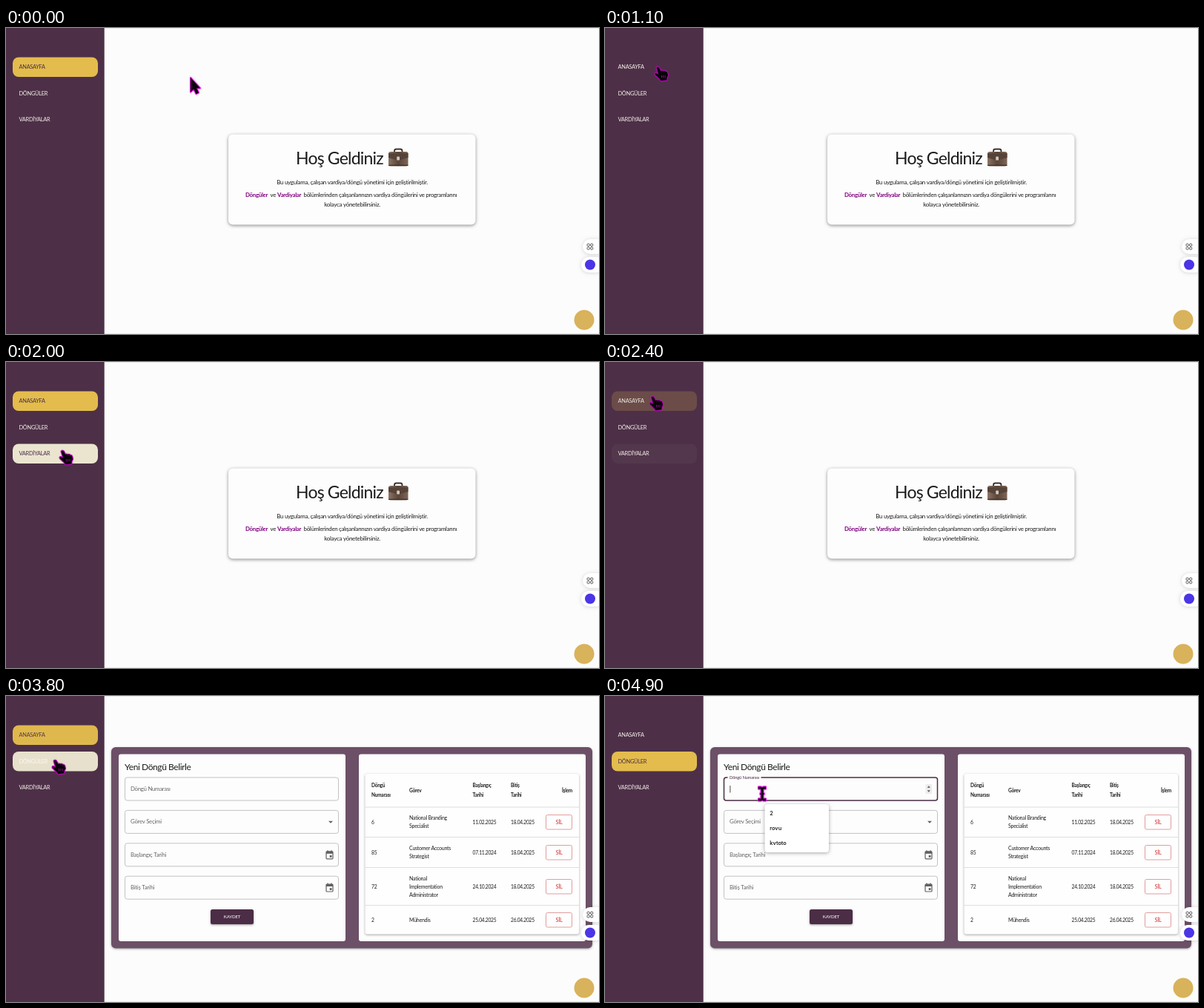
Write an HTML page with a canvas that moves like this. It is 800 px wide and 413 px high and loops after 5 s.

```html
<!DOCTYPE html>
<html lang="tr">
<head>
<meta charset="utf-8">
<title>Vardiya yönetimi</title>
<style>
html, body { margin: 0; width: 100%; height: 100%; overflow: hidden; background: #fcfcfc; }
canvas { display: block; width: 800px; height: 413px; }
</style>
</head>
<body>
<canvas id="stage" width="800" height="413"></canvas>
<script>
const ctx = document.getElementById('stage').getContext('2d');
const LOOP = 5000, STEP = 100, FADE = 250;
const PAGE_AT = 3800, FOCUS_AT = 4600, MENU_AT = 4700;
const FONT = 'Lato, "Noto Sans", sans-serif', TRACKING = -0.035;
const PLUM = [77, 48, 71], YELLOW = [227, 188, 77], CREAM = [235, 229, 208], LIGHT = [244, 238, 232];
const DARK = '#4b2d46', INK = '#1c1c1c', GREY = '#666';

const rgb = c => `rgb(${c.map(Math.round).join()})`;
const mix = (a, b, k) => a + (b - a) * k;
const blend = (a, b, k) => a.map((v, i) => mix(v, b[i], k));
const clamp = v => Math.min(1, Math.max(0, v));
const smooth = p => p * p * (3 - 2 * p);

// Each menu entry fades towards a new fill level at the listed times.
const menu = [
  { label: 'ANASAYFA', y: 39.5, start: 1, keys: [[600, 0], [1270, 1], [2222, 0], [2820, 1], [3775, 0]], tint: () => YELLOW },
  { label: 'DÖNGÜLER', y: 75, start: 0, keys: [[1350, 1], [1690, 0], [2940, 1], [3775, 0], [4250, 1]], tint: t => t < 4200 ? CREAM : YELLOW },
  { label: 'VARDİYALAR', y: 110.5, start: 0, keys: [[1740, 1], [2180, 0]], tint: () => CREAM }
];

const path = [
  [0, 249, 67], [200, 232, 71], [400, 150, 62], [600, 90, 55], [800, 70, 52], [1100, 71, 53],
  [1300, 72, 70], [1400, 73, 86], [1600, 76, 98], [1700, 78, 109], [1900, 78, 122], [2100, 74, 118],
  [2250, 67, 65], [2400, 64, 47], [2700, 65, 50], [2850, 65, 70], [3000, 65, 80], [3100, 65, 83],
  [3800, 66, 87], [4200, 72, 89], [4400, 150, 118], [4600, 206, 128], [4900, 212, 132]
];

const rows = [
  [170, '6', ['National Branding', 'Specialist'], '11.02.2025', '18.04.2025'],
  [211, '85', ['Customer Accounts', 'Strategist'], '07.11.2024', '18.04.2025'],
  [257, '72', ['National', 'Implementation', 'Administrator'], '24.10.2024', '18.04.2025'],
  [302, '2', ['Mühendis'], '25.04.2025', '26.04.2025']
];

function text(str, x, y, size, color = INK, align = 'left', weight = 400, family = FONT) {
  ctx.font = `${weight} ${size}px ${family}`;
  ctx.letterSpacing = family === FONT ? `${TRACKING * size}px` : '0px';
  ctx.textAlign = align;
  ctx.textBaseline = 'alphabetic';
  ctx.fillStyle = color;
  ctx.fillText(str, x, y);
  return ctx.measureText(str).width;
}

function box(x, y, w, h, r, fill, stroke, line = 1) {
  ctx.beginPath();
  ctx.roundRect(x, y, w, h, r);
  if (fill) { ctx.fillStyle = fill; ctx.fill(); }
  if (stroke) { ctx.strokeStyle = stroke; ctx.lineWidth = line; ctx.stroke(); }
}

function raised(blur, dy, alpha, draw) {
  ctx.save();
  ctx.shadowColor = `rgba(0,0,0,${alpha})`;
  ctx.shadowBlur = blur;
  ctx.shadowOffsetY = dy;
  draw();
  ctx.restore();
}

function disc(x, y, r, color) {
  ctx.beginPath();
  ctx.arc(x, y, r, 0, 7);
  ctx.fillStyle = color;
  ctx.fill();
}

function poly(points, fill) {
  ctx.beginPath();
  points.forEach(([x, y]) => ctx.lineTo(x, y));
  ctx.closePath();
  ctx.fillStyle = fill;
  ctx.fill();
}

function level(item, t) {
  return item.keys.reduce((v, [at, to]) => mix(v, to, smooth(clamp((t - at) / FADE))), item.start);
}

function drawSidebar(t) {
  ctx.fillStyle = rgb(PLUM);
  ctx.fillRect(0, 0, 132.7, 413);
  for (const item of menu) {
    const k = level(item, t);
    if (k > 0.01) box(9, item.y, 115, 26.5, 8, rgb(blend(PLUM, item.tint(t), k)));
    const pressed = item === menu[1] && t >= PAGE_AT && t < 4300;
    text(item.label, 17.5, item.y + 15.7, 7.4, rgb(pressed ? [250, 247, 242] : blend(LIGHT, PLUM, k * k)));
  }
}

function drawBriefcase() {
  box(524, 163.5, 10.5, 8, 2.5, null, '#3d302b', 1.8);
  const g = ctx.createLinearGradient(516, 0, 542, 0);
  g.addColorStop(0, '#8b7465');
  g.addColorStop(0.5, '#5b4539');
  g.addColorStop(1, '#7d6555');
  box(516, 167, 26.5, 19.5, 2.5, g);
  poly([[516, 169], [542.5, 169], [542.5, 175], [532, 178], [526, 178], [516, 175]], '#56433a');
  ctx.fillStyle = '#3a2c25';
  ctx.fillRect(516, 184.8, 26.5, 1.2);
  box(527.2, 173.5, 3.8, 5, 1, '#d3c8b8');
}

function drawWelcome() {
  raised(4, 1.2, 0.45, () => box(300, 143.5, 333.5, 122, 6, '#fdfdfd'));
  text('Hoş Geldiniz', 391, 183.5, 23);
  drawBriefcase();
  text('Bu uygulama, çalışan vardiya/döngü yönetimi için geliştirilmiştir.', 467, 211, 8, INK, 'center');
  let x = 323;
  const run = (str, gap, color, weight) => { x += text(str, x, 227.5, 7.8, color, 'left', weight) + gap; };
  run('Döngüler', 3.5, '#800080', 700);
  run('ve', 2, INK);
  run('Vardiyalar', 3.5, '#800080', 700);
  run('bölümlerinden çalışanlarınızın vardiya döngülerini ve programlarını', 0, INK);
  text('kolayca yönetebilirsiniz.', 467, 241, 8, INK, 'center');
}

function drawCalendar(x, y) {
  box(x - 4.5, y - 4.5, 9, 10, 1, null, '#606060', 1.2);
  ctx.fillStyle = '#606060';
  ctx.fillRect(x - 4.5, y - 4.5, 9, 3);
  ctx.fillRect(x - 3.2, y - 6, 1.3, 2);
  ctx.fillRect(x + 1.9, y - 6, 1.3, 2);
  ctx.fillRect(x + 0.2, y + 0.7, 2.8, 2.8);
}

function drawForm(t, inField) {
  const focus = t >= FOCUS_AT;
  box(152, 78.5, 306, 252.5, 3, '#fdfdfd');
  text('Yeni Döngü Belirle', 160, 99.5, 12);
  ['Döngü Numarası', 'Görev Seçimi', 'Başlangıç Tarihi', 'Bitiş Tarihi'].forEach((label, i) => {
    const y = 110 + i * 44.4, active = focus && !i;
    const edge = active ? DARK : inField && !i ? '#333' : '#c2c2c2';
    box(160.5, y, 288, 31, 3, null, edge, active ? 1.5 : 1);
    if (!active) return text(label, 168, y + 17.7, 7.8, GREY);
    ctx.fillStyle = '#fdfdfd';
    ctx.fillRect(165.5, y - 2, 45, 4);
    text(label, 168, y + 1.6, 5.8, DARK);
    ctx.fillStyle = INK;
    ctx.fillRect(168.5, 121, 0.8, 9.5);
    box(432.5, 119, 8.5, 13, 1, '#ececec');
    poly([[434.8, 123.8], [438.8, 123.8], [436.8, 121.3]], '#555');
    poly([[434.8, 127.3], [438.8, 127.3], [436.8, 129.8]], '#555');
  });
  poly([[435, 168.7], [441, 168.7], [438, 171.7]], '#606060');
  drawCalendar(436.5, 214.3);
  drawCalendar(436.5, 258.5);
  raised(3, 1, 0.4, () => box(276, 288, 58, 20, 2.5, DARK));
  text('KAYDET', 305, 300.2, 6.2, '#fff', 'center');
}

function drawTable() {
  box(476, 78.5, 306, 252.5, 3, '#fdfdfd');
  raised(3, 1, 0.35, () => box(484.5, 105, 288.5, 216.5, 3, '#fefefe'));
  const head = (lines, x, align) => lines.forEach((s, i) =>
    text(s, x, 129.8 + (i - (lines.length - 1) / 2) * 13, 6.5, INK, align, 700));
  head(['Döngü', 'Numarası'], 493);
  head(['Görev'], 544);
  head(['Başlangıç', 'Tarihi'], 629.5);
  head(['Bitiş', 'Tarihi'], 681);
  head(['İşlem'], 764, 'right');
  ctx.fillStyle = '#dedede';
  for (const y of [149.5, 190, 231, 282]) ctx.fillRect(484.5, y, 288.5, 1);
  for (const [y, id, job, from, to] of rows) {
    text(id, 493, y + 2.6, 6.7);
    job.forEach((s, i) => text(s, 544, y + 2.6 + (i - (job.length - 1) / 2) * 11, 7));
    text(from, 629.5, y + 2.6, 6.7);
    text(to, 681, y + 2.6, 6.7);
    box(728.5, y - 9.5, 35, 19.5, 2, null, '#e29d9d');
    text('SİL', 746, y + 2.8, 7.4, '#d32f2f', 'center');
  }
}

function drawMenu() {
  raised(5, 1, 0.35, () => box(215.5, 146, 86.5, 65, 4, '#fff'));
  ['2', 'rovu', 'kvtoto'].forEach((s, i) =>
    text(s, 222.3, 161 + i * 20, 7.3, '#222', 'left', 600, 'Inter, sans-serif'));
}

function drawWidgets() {
  raised(5, 0.5, 0.16, () => box(778, 285, 30, 20, 10, '#fff'));
  raised(5, 0.5, 0.16, () => box(776, 309, 30, 21, 10, '#fff'));
  for (const dx of [-2.3, 2.3]) for (const dy of [-2.3, 2.3])
    box(786.2 + dx, 293.4 + dy, 3.4, 3.4, 1.7, null, '#555', 1);
  disc(788, 319.5, 7, '#4b35e6');
  disc(780, 394, 13.5, '#d9b25c');
}

const arrow = new Path2D('M0 0V19.5L4.3 15.5L7.5 22L11 20.3L8 14.2H13Z');
const hand = new Path2D('M-1.4 .6Q0 -1 1.8 .6L4.2 5Q6 3.8 7.4 5.2Q9 4.1 10.4 5.8Q12.5 5.2 13.2 7.5L14 11L12.4 14.2V17.2L4.4 18.2L2.5 15.4L-3 10.2Q-4 8.2 -2.4 8L1.2 9.4Z');
const beam = new Path2D('M-5 -9.5H-1.5L0 -8.6L1.5 -9.5H5V-6.5H1.5V-1H2.5V1H1.5V6.5H5V9.5H1.5L0 8.6L-1.5 9.5H-5V6.5H-1.5V1H-2.5V-1H-1.5V-6.5H-5Z');

function drawCursor(x, y, shape) {
  ctx.save();
  ctx.translate(x, y);
  ctx.lineJoin = 'round';
  ctx.shadowColor = 'rgba(230,0,230,.6)';
  ctx.shadowBlur = 1.5;
  ctx.lineWidth = 2;
  ctx.strokeStyle = shape === hand ? '#b800b8' : '#ee18ee';
  ctx.stroke(shape);
  ctx.shadowBlur = 0;
  ctx.fillStyle = '#080408';
  ctx.fill(shape);
  if (shape === hand) {
    ctx.fillStyle = '#9c109c';
    for (let i = 0; i < 3; i++) ctx.fillRect(5 + i * 2.3, 10.8, 0.8, 3.5);
  }
  ctx.restore();
}

function pointer(t) {
  const i = path.findIndex(p => p[0] > t);
  if (i < 0) return path[path.length - 1].slice(1);
  const [t0, x0, y0] = path[i - 1], [t1, x1, y1] = path[i];
  const k = (t - t0) / (t1 - t0);
  return [mix(x0, x1, k), mix(y0, y1, k)];
}

function draw(t) {
  const [x, y] = pointer(t), form = t >= PAGE_AT;
  const inField = form && x > 160 && x < 449 && y > 110 && y < 141;
  const onMenu = x > 9 && x < 124 && menu.some(m => y >= m.y && y <= m.y + 26.5);

  ctx.fillStyle = '#fcfcfc';
  ctx.fillRect(0, 0, 800, 413);
  ctx.fillStyle = '#ececec';
  ctx.fillRect(133, 0, 667, 1);
  ctx.fillRect(133, 412, 667, 1);
  drawSidebar(t);
  if (form) {
    raised(3, 1, 0.35, () => box(142, 69, 649, 271.5, 6, '#6c5067'));
    drawForm(t, inField);
    drawTable();
    if (t >= MENU_AT) drawMenu();
  } else drawWelcome();
  drawWidgets();
  drawCursor(x, y, inField ? beam : onMenu ? hand : arrow);
}

const begin = performance.now();
function tick() {
  const t = (performance.now() - begin) % LOOP;
  draw(Math.floor(t / STEP) * STEP);
  requestAnimationFrame(tick);
}
tick();
</script>
</body>
</html>
```
